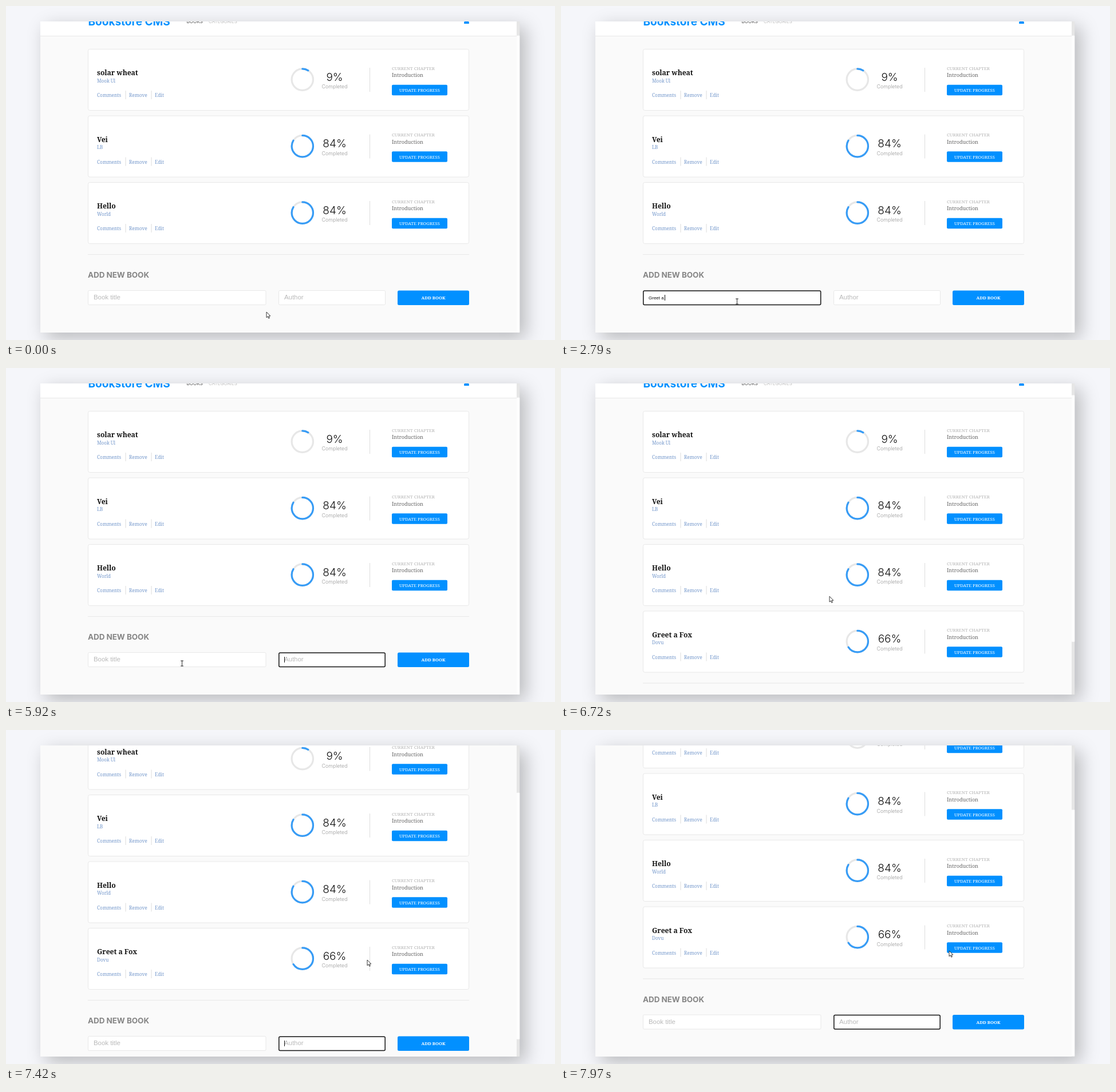
Animation, 959 px wide and 584 px high, one loop 8000 ms. Source, as an HTML page with a canvas:

```html
<!DOCTYPE html>
<html lang="en">
<head>
<meta charset="utf-8">
<title>Bookstore CMS</title>
<style>
html, body { margin: 0; width: 100%; height: 100%; overflow: hidden; background: #f5f6fa; }
canvas { display: block; }
</style>
</head>
<body>
<canvas id="stage" width="959" height="584"></canvas>
<script>
const ctx = document.getElementById('stage').getContext('2d');
const LOOP = 8000, HOLD = 70, BLINK = 530, PITCH = 116.5;
const VIEW = { x: 60, y: 27, w: 837, h: 544 };
const BLUE = '#0290ff', LINE = '#e8e8e8';
const SLAB = '"Noto Serif", serif';
const SANS = 'Inter, "Open Sans", sans-serif';
const FORM = '"Liberation Sans", Arial, sans-serif';

const BOOKS = [
  ['solar wheat', 'Mook Ul', 9],
  ['Vei', 'LB', 84],
  ['Hello', 'World', 84],
  ['Greet a Fox', 'Dovu', 66]
];

// each field gains focus, then is typed at an even pace
const TITLE = { x: 143, w: 311.5, hint: 'Book title', text: BOOKS[3][0], focus: 610, from: 1270, to: 3200 };
const AUTHOR = { x: 476, w: 187, hint: 'Author', text: BOOKS[3][1], focus: 3800, from: 4400, to: 4860 };
const CLEARED = 5460, ADDED = 6050;

const HOME = { x: 455, y: 535 };
const MOVES = [
  { from: 0, to: 140, x: 307, y: 535, bow: 0 },
  { from: 340, to: 410, x: 307, y: 516.5, bow: 0 },
  { from: 6440, to: 7000, x: 631, y: 402, bow: 60 },
  { from: 7690, to: 7910, x: 678, y: 386, bow: 0 }
];

const clamp = v => Math.min(1, Math.max(0, v));
const smooth = u => u * u * (3 - 2 * u);
const progress = (t, from, to) => smooth(clamp((t - from) / (to - from)));

const scrolled = t => t < 7280 ? 0 : 116 * progress(t, 7252, 7523);

function pointerAt(t) {
  let { x, y } = HOME;
  for (const m of MOVES) {
    const u = progress(t, m.from, m.to);
    x += (m.x - x) * u;
    y += (m.y - y) * u - m.bow * Math.sin(Math.PI * u);
  }
  return { x, y };
}

function typing({ text, focus, from, to }, t) {
  const step = (to - from) / (text.length - 1);
  const count = t < from ? 0 : Math.min(text.length, Math.floor((t - from) / step) + 1);
  const last = count ? from + (count - 1) * step : focus;
  return {
    value: t < CLEARED ? text.slice(0, count) : '',
    caret: (t - last) % (2 * BLINK) < BLINK
  };
}

function text(str, x, y, font, color, align = 'left') {
  ctx.font = font;
  ctx.fillStyle = color;
  ctx.textAlign = align;
  ctx.fillText(str, x, y);
}

function rect(x, y, w, h, color) {
  ctx.fillStyle = color;
  ctx.fillRect(x, y, w, h);
}

function box(x, y, w, h, r, fill, stroke, width = 1) {
  ctx.beginPath();
  ctx.roundRect(x, y, w, h, r);
  ctx.fillStyle = fill;
  ctx.fill();
  if (!stroke) return;
  ctx.strokeStyle = stroke;
  ctx.lineWidth = width;
  ctx.stroke();
}

function ring(x, y, part, color) {
  ctx.beginPath();
  ctx.arc(x, y, 18.7, -Math.PI / 2, (part * 2 - 0.5) * Math.PI);
  ctx.strokeStyle = color;
  ctx.lineWidth = 3.2;
  ctx.lineCap = 'round';
  ctx.stroke();
}

function header() {
  rect(VIEW.x, 0, VIEW.w, 52, '#fff');
  rect(VIEW.x, 52, VIEW.w, 1, LINE);
  text('Bookstore CMS', 143.5, 33.5, `700 19px ${SANS}`, BLUE);
  text('BOOKS', 315.5, 30.3, `400 8.1px ${SANS}`, '#444');
  text('CATEGORIES', 354, 30.3, `300 8.1px ${SANS}`, '#aaa');
  box(800, 26, 9, 5, [4, 4, 1, 1], BLUE);
}

function card([title, author, percent], y) {
  ctx.save();
  ctx.translate(0, y);
  box(143.5, 0.5, 665, 107, 3, '#fff', LINE);

  text(title, 159, 46, `700 12.1px ${SLAB}`, '#121212');
  text(author, 159, 58.5, `300 8.1px ${SLAB}`, '#7397cb');
  [['Comments', 159], ['Remove', 215], ['Edit', 260]].forEach(([label, x]) =>
    text(label, x, 84.3, `300 8.3px ${SLAB}`, '#7397cb'));
  rect(208.5, 73, 1, 15, '#dcdcdc');
  rect(253.5, 73, 1, 15, '#dcdcdc');

  ring(517.8, 53.6, 1, '#e7e7e7');
  ring(517.8, 53.6, percent / 100, '#379cf6');
  text(percent + '%', 574, 55.8, `300 19px ${SANS}`, '#121212', 'center');
  text('Completed', 574, 69, `300 8.9px ${SANS}`, '#999', 'center');
  rect(635, 33, 1, 42, '#dedede');

  text('CURRENT CHAPTER', 674, 36.5, `300 7.9px ${SLAB}`, '#b4b4b4');
  text('Introduction', 674, 49, `300 9.1px ${SLAB}`, '#666');
  box(674, 62.8, 97, 18.5, 2, BLUE);
  text('UPDATE PROGRESS', 722.5, 75, `300 7.7px ${SLAB}`, '#fff', 'center');
  ctx.restore();
}

function field(spec, t, focused) {
  const { x, w, hint } = spec;
  const { value, caret } = typing(spec, t);
  const left = x + 10;
  if (focused) box(x + 0.8, 498.1, w - 1.6, 24.4, 2, '#fff', '#111', 1.5);
  else box(x + 0.5, 497.5, w - 1, 25, 2, '#fff', LINE);
  if (value) text(value, left, 513, `8px ${FORM}`, '#111');
  else text(hint, left, 513, `11.4px ${FORM}`, '#bababa');
  if (focused && caret) {
    ctx.font = `8px ${FORM}`;
    rect(Math.floor(left + ctx.measureText(value).width), 505, 1, 10, '#111');
  }
}

function form(y, t) {
  ctx.save();
  ctx.translate(0, y);
  rect(143, 434, 666, 1, LINE);
  text('ADD NEW BOOK', 143, 475.2, `700 13.4px ${SANS}`, '#858585');
  field(TITLE, t, t >= TITLE.focus && t < AUTHOR.focus);
  field(AUTHOR, t, t >= AUTHOR.focus);
  box(684, 497.4, 125, 25.5, 2.5, BLUE);
  text('ADD BOOK', 746.5, 513.2, `700 7.6px ${SLAB}`, '#fff', 'center');
  ctx.restore();
}

function scrollbar(count, shift) {
  const ratio = VIEW.h / (VIEW.h + 26 + (count - 3) * PITCH);
  rect(892, VIEW.y, 5.5, VIEW.h, '#e6e6e6');
  box(892, VIEW.y + (26 + shift) * ratio, 5.5, VIEW.h * ratio, 1, '#fdfdfd');
}

function arrow() {
  ctx.beginPath();
  [[0, 0], [0, 9.8], [2.3, 7.8], [3.8, 11.2], [5.4, 10.5], [3.9, 7.2], [6.8, 7]]
    .forEach(([x, y]) => ctx.lineTo(x, y));
  ctx.closePath();
  ctx.fillStyle = '#fff';
  ctx.fill();
  ctx.lineWidth = 0.9;
  ctx.strokeStyle = '#222';
  ctx.stroke();
}

function beam() {
  rect(-2, -5, 5, 1, '#333');
  rect(0, -5, 1, 10, '#333');
  rect(-2, 4, 5, 1, '#333');
}

function draw(t) {
  const frame = Math.floor(t / HOLD) * HOLD;
  const count = t >= ADDED ? 4 : 3;
  const shift = scrolled(frame);
  const { x, y } = pointerAt(frame);

  rect(0, 0, 959, 584, '#f5f6fa');
  ctx.save();
  ctx.shadowColor = 'rgba(0, 0, 0, .25)';
  ctx.shadowBlur = 30;
  ctx.shadowOffsetX = ctx.shadowOffsetY = 10;
  rect(VIEW.x, VIEW.y, VIEW.w, VIEW.h, '#fafafa');
  ctx.restore();

  ctx.save();
  ctx.beginPath();
  ctx.rect(VIEW.x, VIEW.y, VIEW.w + 0.5, VIEW.h);
  ctx.clip();
  ctx.translate(0, -shift);
  header();
  BOOKS.slice(0, count).forEach((book, i) => card(book, 75 + i * PITCH));
  form((count - 3) * PITCH, t);
  ctx.translate(0, shift);
  scrollbar(count, shift);
  ctx.restore();

  ctx.save();
  ctx.translate(x, y);
  const overField = count === 3 && y > 497 && y < 523;
  overField ? beam() : arrow();
  ctx.restore();
}

const start = performance.now();
function tick() {
  draw((performance.now() - start) % LOOP);
  requestAnimationFrame(tick);
}
tick();
</script>
</body>
</html>
```
